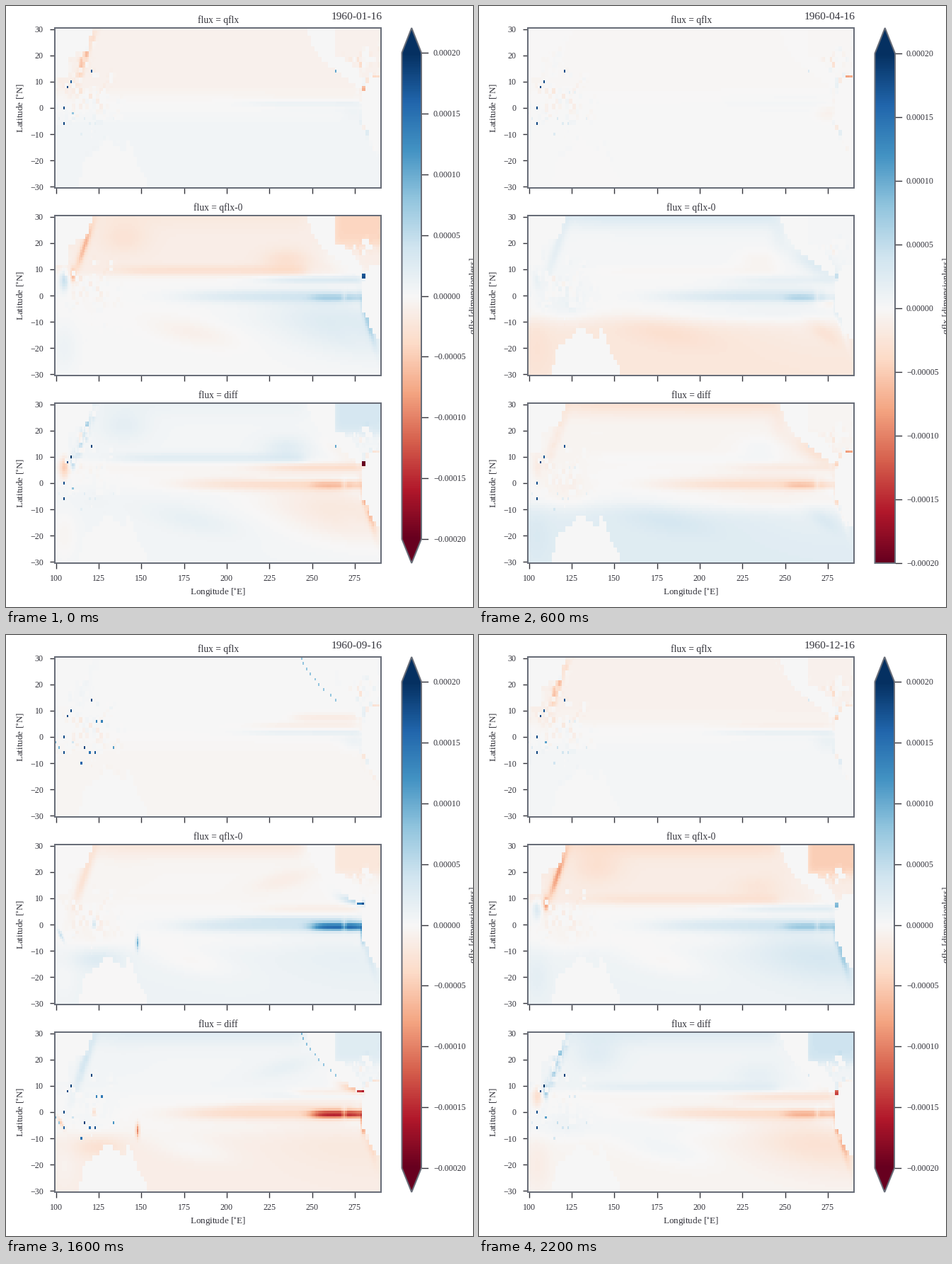
Animation, 660 px wide and 849 px high, one loop 2400 ms. Source, as a matplotlib script:

```python
import numpy as np
import matplotlib.pyplot as plt
from matplotlib.animation import FuncAnimation
from matplotlib.patches import Polygon
from matplotlib.path import Path

W, H, DPI = 660, 849, 100
PX = 72 / DPI
INK, FRAME = "#33333b", "#686d78"
MONTHS = np.arange(12)
LIMIT = 2.0  # flux unit: 1e-4

plt.rcParams.update({
    "font.family": "Liberation Serif", "mathtext.fontset": "stix",
    "text.color": INK, "axes.labelcolor": INK, "axes.edgecolor": FRAME,
    "xtick.color": INK, "ytick.color": INK, "axes.linewidth": 2 * PX,
})

lon, lat = np.meshgrid(np.arange(100, 291), np.arange(-30, 31))
rng = np.random.default_rng(4)


# ---- shapes in space ----
def step(x):
    return 0.5 + 0.5 * np.tanh(x)


def blob(x, y, sx, sy, slope=0):
    dy = lat - y - slope * (lon - x)
    return np.exp(-((lon - x) / sx) ** 2 - (dy / sy) ** 2)


def band(x0, x1, y, h, soft=15):
    ends = step((lon - x0) / soft) * step((x1 - lon) / 4)
    return ends * np.exp(-((lat - y) / h) ** 2)


def block(x, y, w=1, h=1):
    return (abs(lon - x) <= w / 2) & (abs(lat - y) <= h / 2)


# ---- courses over the year ----
def yearly(mean, swing, peak):
    return mean + swing * np.cos(2 * np.pi * (MONTHS - peak) / 12)


def pulse(peak, width, top, floor=0):
    gap = (MONTHS - peak + 6) % 12 - 6
    return floor + (top - floor) * np.exp(-(gap / width) ** 2)


def always(level):
    return np.full(12, level)


def add(field, shape, course):
    field += course[:, None, None] * shape


# ---- land on a two-degree grid ----
COASTS = {
    "asia": [(98, 32), (123, 32), (118, 23), (108, 19), (108, 12), (98, 12)],
    "australia": [(114, -32), (115, -21), (131, -12), (141, -17), (143, -11),
                  (147, -20), (154, -27), (154, -32)],
    "north america": [(246, 32), (250, 24), (258, 17), (277, 8), (283, 9),
                      (276, 13), (272, 18), (264, 20), (264, 32)],
    "south america": [(279, 0), (281, 7), (284, 11), (292, 11), (292, -17),
                      (288, -17), (280, -6)],
}
cell_lon = 100.5 + (lon - 100) // 2 * 2
cell_lat = -29.5 + (lat + 30) // 2 * 2
centres = np.c_[cell_lon.ravel(), cell_lat.ravel()]
land = np.zeros(lon.size, bool)
for shape in COASTS.values():
    land |= Path(shape).contains_points(centres)
land = land.reshape(lon.shape)

speckle = rng.normal(0, 1, (31, 96))[(lat + 30) // 2, (lon - 100) // 2]
islands = blob(122, 3, 24, 11) + blob(280, 19, 8, 5)
land |= speckle * islands > 0.7
sea = ~land

near = np.zeros(lon.shape)
for axis in (0, 1):
    for shift in (-2, 2):
        near = np.maximum(near, np.roll(land, shift, axis))
coast = near * speckle
china_sea = blob(117, 19, 7, 5, 1.65)
peru = blob(283, -10, 4, 4, -1.9)
gulf = step((lon - 263) / 2) * step((lat - 19) / 2)
tongue = 1 - 0.4 * blob(269, 0, 1.2, 4)

# ---- qflx-0 ----
base = np.zeros((12,) + lon.shape)
# northern and southern seasons
add(base, step((lat - 8) / 2), yearly(-.03, .12, 5))
add(base, band(118, 245, 31, 5), yearly(0, .27, 3.5))
add(base, step((-lat - 9) / 3), yearly(-.04, .19, 9.5))
add(base, blob(140, 22, 14, 6), pulse(11.3, 2, -.16))
add(base, band(138, 246, 9.5, 1.9), pulse(.3, 2.3, -.2))
add(base, blob(235, 13.5, 13, 4), pulse(1, 2, -.24))
add(base, blob(234, 17, 18, 3.5, .15), pulse(9, 1.5, -.17))
add(base, blob(247, 25, 5, 7), pulse(5, 1.5, .65))
add(base, gulf, yearly(-.15, .2, 4.5))
# Asian shelf and Indonesia
add(base, china_sea, yearly(-.08, .26, 3.6))
add(base, china_sea ** 3, pulse(11.3, 1.8, -.45))
add(base, blob(110, 8, 1.5, 2.5), pulse(11.3, 1.2, -.7))
add(base, blob(105, 6, 2.5, 4), pulse(.5, 2.2, .5))
add(base, blob(122, -3, 14, 9), pulse(2, 1.5, .18, -.06))
add(base, blob(125, -13, 14, 4), pulse(8.5, 1.3, .22))
add(base, blob(105, -20, 7, 9), yearly(-.03, .13, 11.5))
add(base, blob(148, -7, .9, 2.5), pulse(7, 1.8, 1.3))
add(base, blob(122.5, 0, 1.6, 1.5), pulse(7, 1.3, .65))
add(base, blob(103, -4, 2, 1.2, -1), pulse(7, 1.3, .8))
add(base, coast * islands, always(.08))
# equatorial tongue
add(base, band(178, 281, -.4, 2.4, 20) * tongue, yearly(.3, .06, 8))
add(base, band(205, 276, 2, 1.1) * tongue, pulse(7, 3, .28))
add(base, band(251, 281, -.8, 1.5, 5) * tongue, pulse(7.3, 2.1, 1.3, .3))
add(base, band(225, 279, 6, 1.5), yearly(.05, .24, .5))
add(base, blob(275, 9, 8, 1.4, -.15), pulse(7.7, 2, .5))
# spring pattern in the east
add(base, blob(230, -.6, 28, 1.5), pulse(2, 1.5, .14))
add(base, blob(277, -1, 9, 2.8), pulse(2, 1.5, -.55))
add(base, blob(245, 4, 35, 3), pulse(2, 1.5, .14))
add(base, blob(268, 12, 14, 4, -.3), pulse(2.3, 2, .25, .05))
add(base, blob(225, -8, 45, 4), pulse(2, 1.5, .12))
add(base, blob(273, -14, 9, 3.5, -.35), pulse(2, 1.5, -.2))
# southeast
add(base, blob(268, -11, 42, 11, -.1) * step((2 - lat) / 1.5), pulse(11.5, 2.5, .26, .04))
add(base, blob(180, -14, 26, 5, -.12), always(-.11))
add(base, peru, yearly(.25, .22, 11.5))
add(base, blob(280, -3.5, 1.2, 3.5), pulse(7, 2.5, 1.1, .15))
base *= sea
add(base, block(280.5, 7.5), pulse(.6, 1.8, 1.9))
add(base, block(278.5, 8, 4), pulse(8.2, .8, 1.5))

# ---- qflx ----
flux = np.zeros_like(base)
add(flux, step((lat - 5) / 3), yearly(-.02, .07, 6))
add(flux, step((-lat - 3) / 4), yearly(0, .06, .5))
add(flux, blob(140, 29, 22, 6), pulse(5, 1, .14))
add(flux, blob(247, 25, 4, 6), pulse(5.5, 1, .12))
add(flux, band(220, 277, 4.5, 1.2), yearly(-.05, .08, 2.5))
add(flux, band(215, 280, 1.6, .9), yearly(.12, .08, 9.5))
add(flux, band(235, 279, -.9, 1.1, 10), pulse(5.4, 1.2, -.42, .03))
add(flux, band(240, 278, 7.5, 1.6, 6), pulse(8.5, 1.3, -.2))
add(flux, blob(275, -2, 7, 3), yearly(.02, .12, 9.5))
add(flux, blob(280, -6, 2, 5, -1), pulse(5.5, 1.5, -.5))
add(flux, china_sea * (1 + speckle), pulse(11.5, 1.3, -.22, .02))
add(flux, coast * (islands + blob(282, 4, 6, 22)), always(.11))
flux *= sea

# hot single cells: all year, in the monsoon, and along the Mexican coast
YEAR_ROUND = [(105, 0), (105, -6), (107, 8), (109, 10), (121, 14)]
MONSOON = [(117, -4), (123, -6), (115, -10), (120, -6), (127, 6), (124, 6),
           (134, -4), (100, -2), (102, -4)]
for x, y in YEAR_ROUND:
    add(flux, block(x, y), always(1.8))
for i, (x, y) in enumerate(MONSOON):
    add(flux, block(x, y), pulse(7.2, 3, 2 - .12 * i))
for y in range(14, 31, 2):
    x = round(244 + 20 * ((30 - y) / 16) ** 1.4)
    add(flux, block(x, y), pulse(8.5, 1.3, .9))
add(flux, block(264, 14), pulse(1, 1.5, 1.6))
add(flux, block(110, -2), pulse(10.5, 2.5, 1.1))
add(flux, block(287.5, 12, 3), yearly(-.45, .35, 10))
add(flux, block(280.5, 7.5), pulse(0, 1.5, -.7))

panels = {"qflx": flux, "qflx-0": base, "diff": flux - base}

# ---- figure ----
fig = plt.figure(figsize=(W / DPI, H / DPI), dpi=DPI, facecolor="white")
page = fig.add_axes([0, 0, 1, 1], zorder=-1)
page.axis("off")


def write(x, y, text, size, **kw):
    return page.text(x, y, text, fontsize=size * PX, **kw)


images = []
for row, (name, data) in enumerate(panels.items()):
    top = 31 + 265 * row
    ax = fig.add_axes([69.3 / W, 1 - (top + 226) / H, 461 / W, 226 / H])
    images.append(ax.imshow(data[0], cmap="RdBu", vmin=-LIMIT, vmax=LIMIT,
                            origin="lower", aspect="auto", interpolation="nearest",
                            extent=(99.5, 290.5, -30.5, 30.5)))
    ax.set(xticks=range(100, 290, 25), yticks=range(-30, 31, 10))
    ax.tick_params(length=7.5 * PX, width=1.4 * PX, pad=9 * PX,
                   labelsize=12 * PX, labelbottom=row == 2)
    write(300, top - 7.5, f"flux = {name}", 13.5, ha="center")
    write(20, top + 113, r"Latitude [$^{\circ}$N]", 13.1,
          ha="center", va="center", rotation=90)

write(300, 831, r"Longitude [$^{\circ}$E]", 13.1, ha="center")
write(655, 409, "qflx [dimensionless]", 13.1, ha="left", va="center", rotation=90)
date = write(532, 19, "", 15.4, ha="right")


def colour_bar(top, bottom, right, both):
    """Draw a bar with one or two pointed ends; return its artists."""
    left, mid = 559.5, (559.5 + right) / 2
    cmap = plt.get_cmap("RdBu")
    ramp = np.linspace(1, 0, 256)[:, None]
    parts = [page.imshow(ramp, cmap=cmap, vmin=0, vmax=1, aspect="auto",
                         interpolation="nearest", extent=(left, right, bottom, top))]
    outline = [(left, top), (mid, 31), (right, top), (right, bottom)]
    parts.append(page.add_patch(Polygon(outline[:3], color=cmap(1.0), lw=0)))
    if both:
        tip = [(right, bottom), (mid, 787), (left, bottom)]
        parts.append(page.add_patch(Polygon(tip, color=cmap(0.0), lw=0)))
        outline.append((mid, 787))
    outline.append((left, bottom))
    parts.append(page.add_patch(Polygon(outline, fill=False, ec=FRAME, lw=2 * PX)))
    for i in range(9):
        y = top + (bottom - top) * i / 8
        label = f"{(4 - i) * 5e-5:.5f}".replace("-", "\u2212")
        parts += page.plot([right + 1, right + 8.5], [y, y], color=INK, lw=1.4 * PX)
        parts.append(write(604, y + 4, label, 12))
    return parts


bars = {True: colour_bar(66, 753, 587, True),
        False: colour_bar(67, 787, 588, False)}
page.set(xlim=(0, W), ylim=(H, 0))
ONE_ENDED = {3, 4, 5, 9, 10}


def draw(month):
    for image, data in zip(images, panels.values()):
        image.set_data(data[month])
    date.set_text(f"1960-{month + 1:02d}-16")
    for both, parts in bars.items():
        for part in parts:
            part.set_visible(both == (month not in ONE_ENDED))
    return images


anim = FuncAnimation(fig, draw, frames=12, interval=200, repeat=True,
                     repeat_delay=0, blit=False)
plt.show()
```
